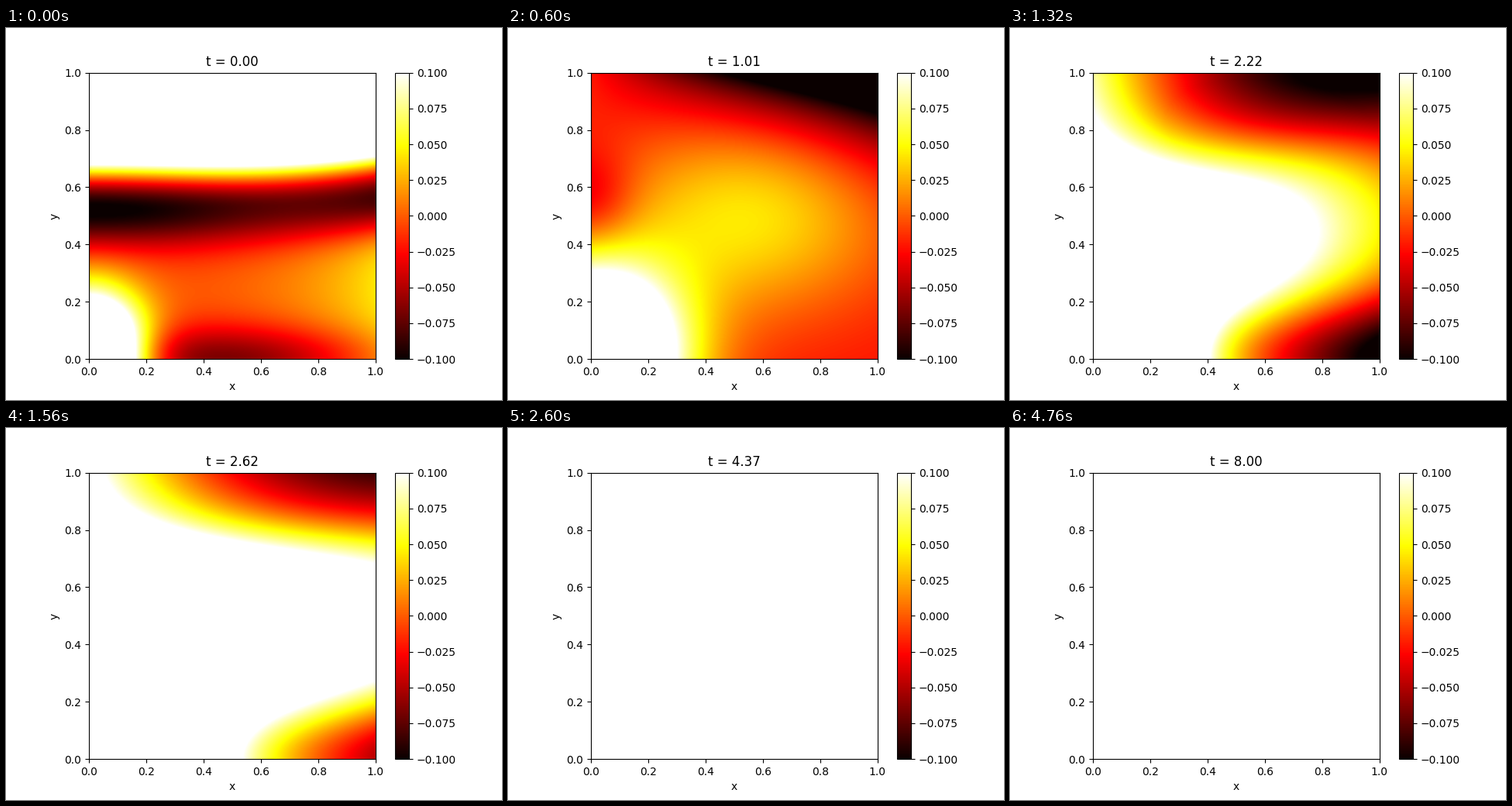
A matplotlib script for the animation above (4800 ms loop, 640 px wide and 480 px high).

```python
import numpy as np
import matplotlib.pyplot as plt
from matplotlib.animation import FuncAnimation

FRAMES = 120
INTERVAL = 40
T_END = 8.0
STEP = T_END / (FRAMES - 1)
GRID = 370

axis = (np.arange(GRID) + 0.5) / GRID
x, y = np.meshgrid(axis, axis)


def bump(d, width):
    return np.exp(-(d / width) ** 2)


def sigmoid(z):
    return 1 / (1 + np.exp(-z))


# Field shapes below are in hundredths.
def dark_band():
    """Dark valley across the middle, steep above, with a hot corner."""
    d = y - (0.52 + 0.04 * x ** 3)
    depth = -8.9 - 1.5 * np.cos(4.2 * x)
    floor = 4.6 * x ** 3 - 0.3
    lift = np.where(d > 0, 90, floor - depth)
    width = np.where(d > 0, 0.31, 0.13)
    valley = depth + lift * (1 - bump(d, width))
    corner = 33 * bump(x, 0.185) * bump(y, 0.21)
    dip = 6.8 * bump(x - 0.5, 0.6) * bump(y, 0.117)
    return valley + corner - dip


def dome():
    """Broad warm hill, hot corner and a top edge cooling to the right."""
    hill = 6.6 * bump(x - 0.55, 0.5) * bump(y - 0.5, 0.35) - 2.3
    corner = 29.7 * bump(x, 0.309) * bump(y, 0.313)
    notch = 3.5 * bump(x, 0.15) * bump(y - 0.55, 0.17)
    top = 19 * x * y ** (8 - 3 * x)
    return hill + corner - notch - top


def tongue(ridge, lift, edge, drop, steep, width):
    """Hot ridge from the left between a cool top and a cool lower right."""
    top = lift + 5 - 40 * x + 18 * x ** 2
    ridge_share = sigmoid(10 * (edge - y))
    low = drop * sigmoid(steep * (x - 0.37)) * bump(y, width)
    return top + (ridge - top) * ridge_share - low


narrow = tongue(ridge=26 - 27 * x, lift=0, edge=0.53 + 0.32 * x,
                drop=14.5, steep=17, width=0.22)
wide = tongue(ridge=40 - 22 * x, lift=5.5, edge=0.70 + 0.08 * x,
              drop=23, steep=8, width=0.265)

times = STEP * np.array([0, 15, 27, 39, 52])
keys = np.array([dark_band(), dome(), narrow, wide, wide + 22]) / 100

# Monotone slopes: no overshoot between the key fields.
rates = np.diff(keys, axis=0) / np.diff(times)[:, None, None]
before, after = rates[:-1], rates[1:]
same = before * after > 0
total = np.where(same, before + after, 1)
inner = np.where(same, 2 * before * after / total, 0)
slopes = np.concatenate([rates[:1], inner, rates[-1:]])


def field(t):
    t = min(t, times[-1])
    i = min(np.searchsorted(times, t, side="right") - 1, len(times) - 2)
    h = times[i + 1] - times[i]
    s = (t - times[i]) / h
    blend = s * s * (3 - 2 * s)
    return (keys[i] * (1 - blend) + keys[i + 1] * blend
            + h * s * (1 - s) * (slopes[i] * (1 - s) - slopes[i + 1] * s))


fig, ax = plt.subplots(figsize=(6.4, 4.8), dpi=100)
image = ax.imshow(field(0), extent=(0, 1, 0, 1), origin="lower",
                  cmap="hot", vmin=-0.1, vmax=0.1)
fig.colorbar(image, ax=ax)
ax.set_xlabel("x")
ax.set_ylabel("y")
title = ax.set_title("t = 0.00")


def update(frame):
    t = frame * STEP
    image.set_data(field(t))
    title.set_text(f"t = {t:.2f}")
    return image, title


anim = FuncAnimation(fig, update, frames=FRAMES, interval=INTERVAL,
                     repeat=True, repeat_delay=0, blit=False)
plt.show()
```
